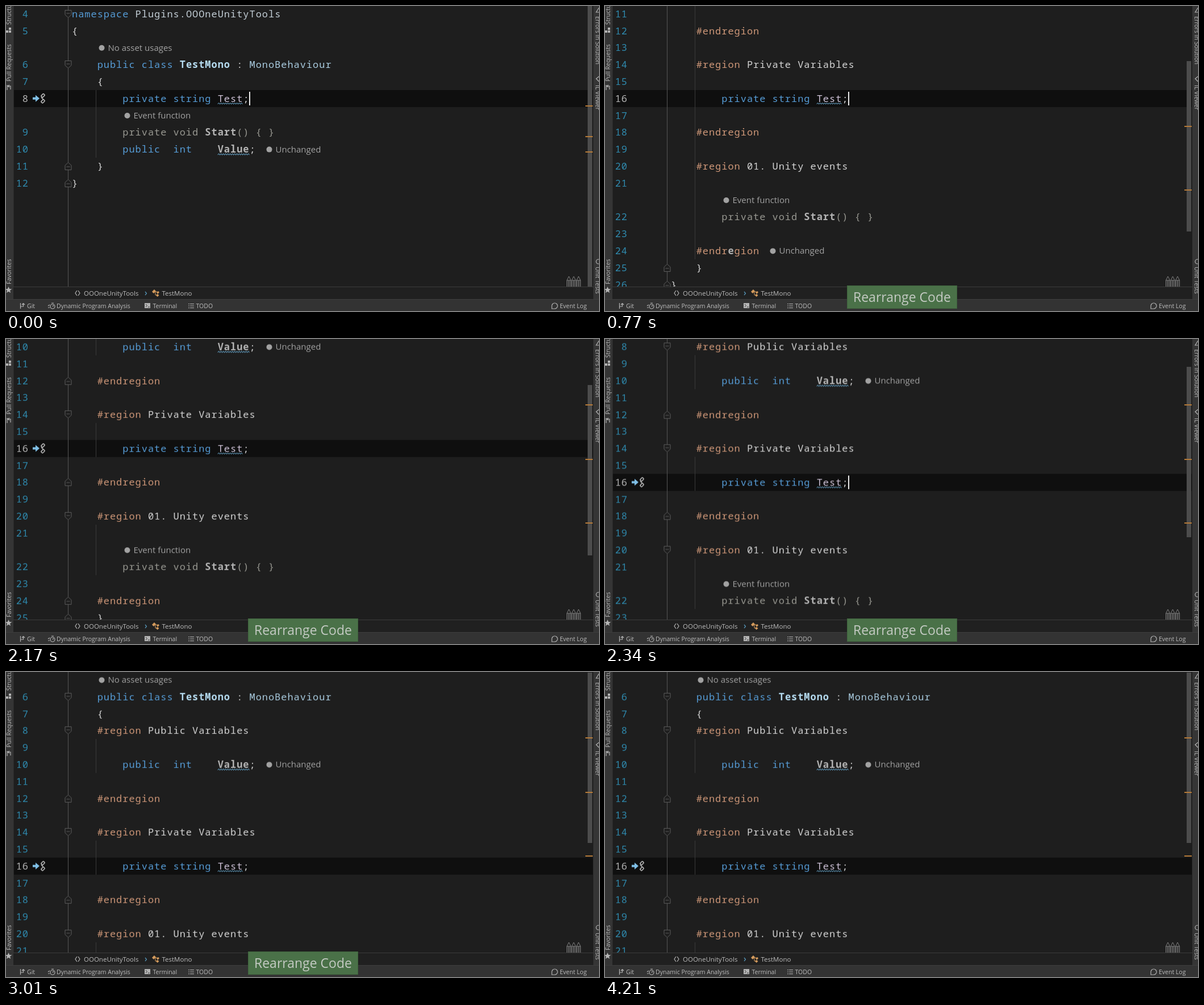
Animation of 1044 by 537 pixels, one loop 4370 ms. Source, as an HTML page:

```html
<!DOCTYPE html>
<html lang="en">
<head>
<meta charset="utf-8">
<title>Rearrange code</title>
<style>
  html, body { margin: 0; width: 100%; height: 100%; overflow: hidden; background: #1e1e1e; }
  svg { display: block; width: 1044px; height: 537px; }
  text { white-space: pre; font-family: "Open Sans", "Noto Sans", sans-serif; }
  .code { font: 17px "Noto Sans Mono", "DejaVu Sans Mono", monospace; letter-spacing: .96px; fill: #d4d4d4; }
  .num { fill: #2f8aae; }
  .cur { fill: #b5b5b5; }
  .kw { fill: #569cd6; }
  .ns { fill: #c3ced6; }
  .cls { fill: #b5dbf0; font-weight: bold; }
  .base { fill: #a9cbdf; }
  .field { fill: #cfc3d8; }
  .dim { fill: #979790; }
  .bold { fill: #b4b4b4; font-weight: bold; }
  .pre { fill: #ce9778; }
  .inlay { font-size: 15px; fill: #a2a2a2; }
  .dot { fill: #a2a2a2; }
  .wave { fill: none; stroke: #5b8fae; stroke-width: 1.1; }
  .fold { fill: #1e1e1e; stroke: #5c5c5c; }
  .guide { fill: #3a3a3a; }
  .caret { fill: #e8e8e8; }
  .mark { fill: #b57a38; }
  .thumb { fill: #4c4c4c; }
  rect { shape-rendering: crispEdges; }
  .ui { font-size: 10.5px; fill: #bdbdbd; }
  .crumb { font-size: 11.5px; fill: #bdbdbd; }
  .line { fill: none; stroke: #b4b4b4; stroke-width: 1.2; }
  .solid { fill: #b4b4b4; }
  .link { shape-rendering: auto; }
</style>
</head>
<body>
<svg viewBox="0 0 1044 537">
  <defs>
    <clipPath id="view"><rect x="14" width="1020" height="494"/></clipPath>
    <g id="jump">
      <path d="M-12-2h5v-4l7 6-7 6v-4h-5z" fill="#7fbfe6"/>
      <g fill="none" stroke="#bcbcbc" stroke-width="1.6">
        <rect class="link" x="-3" y="-2" width="6" height="4" rx="1" transform="translate(6-5) rotate(-45)"/>
        <rect class="link" x="-3" y="-2" width="6" height="4" rx="1" transform="translate(6 5) rotate(-45)"/>
        <path d="M3-2l4 4"/>
      </g>
    </g>
    <path id="pencil" d="M.5 18V7L4 0l3.5 7v11M.5 7h7M3 7v11M5 7v11" fill="none" stroke="#808080"/>
  </defs>
  <rect width="1044" height="537" fill="#1e1e1e"/>

  <g clip-path="url(#view)">
    <g id="before"></g>
    <g id="after"><g id="scroll"></g></g>
    <g transform="translate(987 476)">
      <use href="#pencil"/><use href="#pencil" x="8.5"/><use href="#pencil" x="17"/>
    </g>
    <g id="oldbar">
      <rect class="thumb" x="1024" width="8" height="494"/>
      <path class="mark" d="M1020 175h13v2h-13zM1020 229h13v2h-13zM1020 256h13v2h-13z"/>
    </g>
    <g id="newbar">
      <rect id="thumb" class="thumb" x="1024" y="17" width="8" height="300"/>
      <path class="mark" d="M1020 211h13v2h-13zM1020 323h13v2h-13z"/>
      <path class="mark late" d="M1020 115h13v2h-13z"/>
    </g>
  </g>

  <!-- side strips -->
  <rect width="13" height="517" fill="#353535"/>
  <rect x="13" width="1" height="494" fill="#292929"/>
  <rect x="1034" width="10" height="517" fill="#353535"/>
  <g class="ui">
    <text transform="translate(9 33) rotate(-90)">Structure</text>
    <text transform="translate(9 133) rotate(-90)">Pull Requests</text>
    <text transform="translate(9 490) rotate(-90)">Favorites</text>
    <text transform="translate(1038 18) rotate(90)">Errors In Solution</text>
    <text transform="translate(1038 139) rotate(90)">IL Viewer</text>
    <text transform="translate(1038 459) rotate(90)">Unit Tests</text>
  </g>
  <path class="solid" d="M5 38h4v4H5zM0 43h4v4H0zM5 43h4v4H5z"/>
  <path class="line" d="M2 139v9M2 141h6v6M6 139l-3 2 3 2"/>
  <path class="solid" d="M4.500 494l1.600 4 4.200.2-3.300 2.700 1.200 4.100-3.700-2.300L.8 505 2 500.900-1.300 498.200l4.200-.2z"/>
  <path class="line" d="M1044 3l-5 8h5M1044 124l-5 4 5 5"/>
  <circle class="line" cx="1043" cy="450" r="4"/>

  <!-- breadcrumbs -->
  <rect x="13" y="494" width="1021" height="23" fill="#202020"/>
  <rect x="13" y="494" width="1021" height="1" fill="#3b3b3b"/>
  <path class="line" d="M125 501l-3 4.500 3 4.500M127 501l3 4.500-3 4.500"/>
  <text class="crumb" x="137" y="510">OOOneUnityTools</text>
  <path d="M245 503l2.500 3-2.500 3" fill="none" stroke="#5799bd" stroke-width="1.2"/>
  <path d="M257 503l4-4 3 3-4 4zM265 504l3-2 2 2-3 3zM264 509l3-2 2.500 2.500-3 2.500z" fill="#d39a5c"/>
  <path d="M261 503h5M263 503v6h3" fill="none" stroke="#d39a5c"/>
  <text class="crumb" x="274.500" y="510">TestMono</text>

  <!-- tool bar -->
  <rect y="516" width="1044" height="21" fill="#333"/>
  <rect y="516" width="1044" height="1" fill="#3d3d3d"/>
  <path class="line" d="M25.500 523v10M25.500 529h5v-5M28 526l2.500-2.500 2.500 2.500"/>
  <circle class="line" cx="82" cy="529" r="4"/>
  <path class="line" d="M74 528l3-2M74 531h3M80 523h4M82 529l2-2"/>
  <rect class="solid" x="244" y="523" width="10" height="9"/>
  <path d="M246 525l2.500 2.500-2.500 2.500M250 530h3" fill="none" stroke="#333"/>
  <path class="line" d="M321 524.500h2M321 528h2M321 531.500h2M324 524.500h7M324 528h7M324 531.500h7"/>
  <path class="line" d="M961 533v-5a5 5 0 1 1 5 5z"/>
  <g class="ui">
    <text x="37" y="532">Git</text>
    <text x="89" y="532">Dynamic Program Analysis</text>
    <text x="258.500" y="532">Terminal</text>
    <text x="334.500" y="532">TODO</text>
    <text x="975" y="532">Event Log</text>
  </g>

  <g id="popup">
    <rect x="426" y="492" width="194" height="41" fill="#3f633d"/>
    <rect x="427" y="493" width="192" height="39" fill="#4a7148"/>
    <text x="523" y="521" text-anchor="middle" font-size="23" fill="#c4cac3">Rearrange Code</text>
  </g>
</svg>
<script>
const LOOP = 4370, PITCH = 29.8, CELL = 11.16, LEFT = 116;
const $ = id => document.getElementById(id);
const rowY = r => r * PITCH - 1.3;
const colX = c => LEFT + c * CELL;

const number = (r, n, cls = 'num') =>
  `<text class="code ${cls}" x="${40 - CELL * String(n).length}" y="${rowY(r) + 21}">${n}</text>`;

// parts: alternating class and text
function code(r, col, ...parts) {
  let spans = '';
  for (let i = 0; i < parts.length; i += 2)
    spans += `<tspan class="${parts[i]}">${parts[i + 1]}</tspan>`;
  return `<text class="code" x="${colX(col)}" y="${rowY(r) + 21}">${spans}</text>`;
}

const inlay = (r, x, label) =>
  `<circle class="dot" cx="${x + 5.5}" cy="${rowY(r) + 15.5}" r="5"/>` +
  `<text class="inlay" x="${x + 16.5}" y="${rowY(r) + 20.5}">${label}</text>`;

function wave(r, col, len) {
  const n = Math.round(len * CELL / 4);
  return `<path class="wave" d="M${colX(col)} ${rowY(r) + 25}${'l2-2l2 2'.repeat(n)}"/>`;
}

const fold = (r, dir) =>
  `<path class="fold" transform="translate(109.5 ${Math.round(rowY(r) + 15)}) scale(1 ${dir})"
    d="M-5.500-6.500h11v8l-5.500 5-5.500-5zM-3-1h6"/>`;

const guide = (from, to) =>
  `<rect class="guide" x="158" y="${rowY(from)}" width="1" height="${(to - from) * PITCH}"/>`;
const band = r => `<rect x="14" y="${rowY(r)}" width="1019" height="30" fill="#0f0f0f"/>`;
const spine = '<rect x="109" y="-300" width="1" height="1400" fill="#555"/>';
const caret = r => `<rect class="caret" x="428" y="${rowY(r) + 3}" width="2" height="24"/>`;
const jump = r => `<use href="#jump" x="59" y="${rowY(r) + 15}"/>`;
const group = (cls, ...items) => `<g class="${cls}">${items.join('')}</g>`;

const classLine = r => code(r, 4, 'kw', 'public class ', 'cls', 'TestMono', '', ' : ', 'base', 'MonoBehaviour');
const testLine = r => code(r, 8, 'kw', 'private string ', 'field', 'Test', '', ';') + wave(r, 23, 4) + caret(r);
const startLine = r => code(r, 8, 'dim', 'private void ', 'bold', 'Start', 'dim', '() { }');
const valueLine = r => code(r, 8, 'kw', 'public  int    ', 'bold', 'Value', '', ';') + wave(r, 23, 5) + inlay(r, 458, 'Unchanged');
const region = (r, title) => code(r, 4, 'pre', '#region ', '', title);
const endRegion = r => code(r, 4, 'pre', '#endregion');

const oldRows = { 4: 0, 5: 1, 6: 3, 7: 4, 8: 5, 9: 7, 10: 8, 11: 9, 12: 10 };
$('before').innerHTML = [
  band(5), spine, guide(5, 9),
  ...Object.entries(oldRows).map(([n, r]) => number(r, n, n == 8 ? 'cur' : 'num')),
  fold(0, 1), fold(3, 1), fold(9, -1), fold(10, -1), jump(5),
  code(0, 0, 'kw', 'namespace ', 'ns', 'Plugins.OOOneUnityTools'),
  code(1, 0, '', '{'),
  inlay(2, 163, 'No asset usages'), classLine(3), code(4, 4, '', '{'),
  testLine(5), inlay(6, 208, 'Event function'), startLine(7), valueLine(8),
  code(9, 4, '', '}'), code(10, 0, '', '}')
].join('');

// row of a line in the rearranged file, line 6 being row 0
const at = n => n - 6 + (n > 21 ? 1 : 0);
const lines = Array.from({ length: 21 }, (_, i) => i + 6);
$('scroll').innerHTML = [
  band(at(16)), spine,
  group('rough', guide(at(11), at(25))),
  group('folds', guide(at(9), at(11)), guide(at(15), at(17)), guide(at(21), at(23)),
    ...[6, 8, 14, 20].map(n => fold(at(n), 1)),
    ...[12, 18, 24].map(n => fold(at(n), -1))),
  fold(at(25), -1), fold(at(26), -1),
  ...lines.map(n => number(at(n), n, n == 16 ? 'cur' : 'num')),
  group('icon', jump(at(16))),
  inlay(-1, 163, 'No asset usages'), classLine(0), code(1, 4, '', '{'),
  region(at(8), 'Public Variables'), valueLine(at(10)), endRegion(at(12)),
  region(at(14), 'Private Variables'), testLine(at(16)), endRegion(at(18)),
  region(at(20), '01. Unity events'), inlay(16, 208, 'Event function'),
  startLine(at(22)),
  group('stale', code(at(24), 4, 'pre', '#endr', 'bold', 'e', 'pre', 'gion'), inlay(at(24), 290, 'Unchanged')),
  group('clean', endRegion(at(24))),
  code(at(25), 4, '', '}'), code(at(26), 0, '', '}')
].join('');

let css = '', count = 0;
function steps(sel, prop, keys) {
  const id = 'k' + count++;
  const frames = keys.map(([ms, v]) => `${ms / LOOP * 100}%{${prop}:${v}}`).join('');
  css += `@keyframes ${id}{${frames}}${sel}{animation:${id} ${LOOP}ms step-end infinite}`;
}
const toggle = (sel, first, ...times) =>
  steps(sel, 'opacity', [0, ...times].map((ms, i) => [ms, (first + i) % 2]));

toggle('#before,#oldbar', 1, 770);
toggle('#after,#newbar', 0, 770);
toggle('.stale', 1, 830);
toggle('.clean', 0, 830);
toggle('.rough', 1, 890);
toggle('.folds', 0, 890);
toggle('.icon', 0, 950);
toggle('.late', 0, 1020);
toggle('.caret', 1, 130, 390, 670, 770, 1500, 1790, 2080, 2340, 2980, 3270, 3670, 3950, 4210);
steps('#popup', 'opacity', [[0, 0], [720, .5], [770, 1], [3270, .66], [3300, .33], [3330, 0]]);

const firstRow = [[0, 5], [2170, 4], [2270, 3], [2340, 2], [2460, 1], [2560, 0], [3010, -1]];
const shift = px => firstRow.map(([ms, r]) => [ms, `translateY(${r * px}px)`]);
steps('#scroll', 'transform', shift(-PITCH));
steps('#thumb', 'transform', shift(16));

document.head.appendChild(document.createElement('style')).textContent = css;
</script>
</body>
</html>
```
